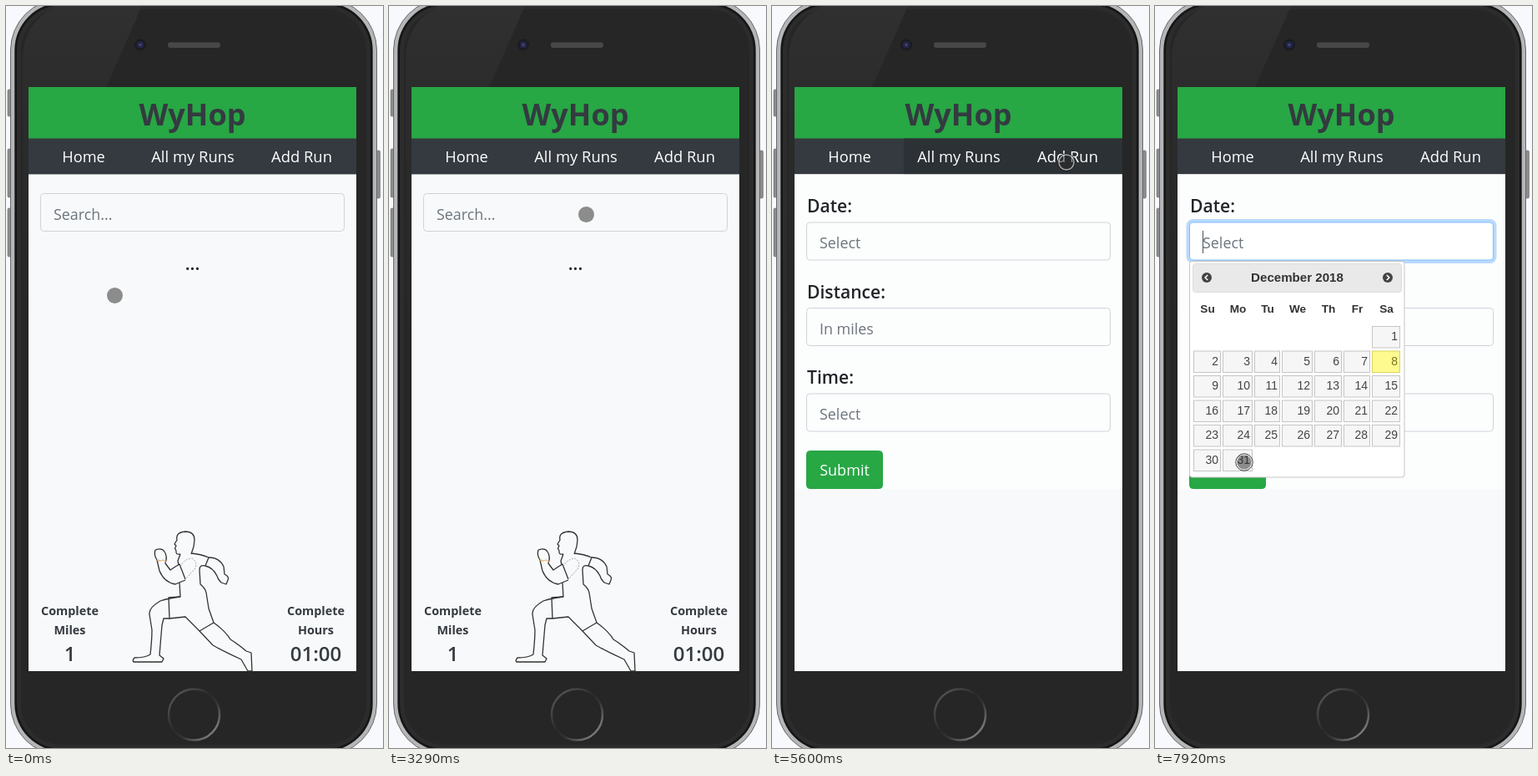
Recreate the animation shown at these times as an HTML page. Size 452 px wide and 888 px high, loop 8000 ms.

```html
<!DOCTYPE html>
<html lang="en">
<head>
<meta charset="utf-8">
<title>Run tracker demo</title>
<style>
  html, body { margin: 0; width: 100%; height: 100%; overflow: hidden; background: #f8f9fc; }
  svg { display: block; width: 452px; height: 888px; font-family: "Open Sans", "Noto Sans", sans-serif; }
  .cal { font-family: "Liberation Sans", Arial, sans-serif; }
</style>
</head>
<body>
<svg id="stage" viewBox="0 0 452 888" xmlns="http://www.w3.org/2000/svg"></svg>
<script>
const LOOP = 8000;
const INK = '#212529', DARK = '#343a40', GREEN = '#28a745', MUTED = '#6c757d', PAPER = '#f8f9fa';

const rect = (x, y, w, h, fill, more = '') =>
  `<rect x="${x}" y="${y}" width="${w}" height="${h}" fill="${fill}" ${more}/>`;
const text = (x, y, size, fill, str, weight = 400, anchor = 'start') =>
  `<text x="${x}" y="${y}" font-size="${size}" fill="${fill}" font-weight="${weight}" text-anchor="${anchor}">${str}</text>`;
const mid = (x, y, size, fill, str, weight) => text(x, y, size, fill, str, weight, 'middle');
const group = (id, body, more = '') => `<g id="${id}" ${more}>${body}</g>`;
const path = (d, more = '') => `<path d="${d}" ${more}/>`;

const input = (y, hint, id) =>
  rect(41.5, y + .5, 364, 45, 'none', 'rx="4" stroke="#ced4da"') +
  (id ? group(id, rect(39.5, y - 1.5, 368, 49, 'none', 'rx="6" stroke="#b9dafb" stroke-width="4"') +
    rect(41.5, y + .5, 364, 45, '#fff', 'rx="4" stroke="#80bdff"')) : '') +
  `<g ${id ? `id="${id}Hint"` : ''}>${text(57, y + 31.5, 17.9, MUTED, hint)}</g>`;

const button = (x, w, y, label, color, fill, ink) =>
  rect(x + .5, y + .5, w - 1, 45, fill, `rx="4" stroke="${color}"`) +
  mid(x + w / 2, y + 30, 18, ink, label);

function phone() {
  const shell = (inset, fill, more = '') =>
    rect(5 + inset, -9 + inset, 440 - inset * 2, 906 - inset * 2, fill, `rx="${62 - inset}" ${more}`);
  const key = (x, y, h) => rect(x, y, 4, h, '#8b8c8e', 'rx="1.5" stroke="#666" stroke-width=".6"');
  return key(2, 100, 32) + key(2, 171, 58) + key(2, 242, 58) + key(444.5, 173, 57) +
    shell(.5, '#b4b6b8', 'stroke="#66686a"') + shell(5.3, '#161616') + shell(8, '#2c2c2c') + shell(13, '#262626') +
    path('M20 400V60Q22 18 62 0H163L120 97H27V390Z', 'fill="url(#glare)"') +
    '<circle cx="161" cy="46.5" r="7" fill="#1b1c22"/><circle cx="161" cy="46.5" r="4" fill="#25274a"/><circle cx="161" cy="46.5" r="1.4" fill="#474b80"/>' +
    rect(194, 43.5, 63, 6.5, 'url(#mesh)', 'rx="3.2"') +
    '<circle cx="225.5" cy="848" r="30.5" fill="none" stroke="url(#ring)" stroke-width="2.4"/>';
}

function runner() {
  const lines = [
    'M209 656Q203 657 204 652L202.500 649L204 646L202 644L205 639Q203 630 215 629Q226 629 226 639L225 647L222 656',
    'M209 656L206 664L207 669M222 655Q234 656 243 660L239 670Q232 668 232 675L233 692Q239 697 240 702L243 721L249 738L232 748L215 731L196 733L195 708L209 707L208 690',
    'M190 653Q187 648 179 651Q177 657 181 663L184 676Q190 690 203 692L215 687M190 653Q194 659 191 667L197 675L203 671L208 668L215 686',
    'M243 660Q256 660 261 671L262 680Q268 683 266 687L264 692L258 690Q254 686 253 682Q248 672 239 670',
    'M209 707Q194 709 185 712Q171 720 172 728L175 747Q175 758 173 776Q167 780 154 780Q151 783 153 785H187L189 781L184 777L187 741L189 733H196',
    'M249 738Q263 748 269 758Q280 765 288 772L294 774L295 796H290L282 782Q262 773 248 765L232 748'
  ];
  return lines.map(d => path(d)).join('') +
    path('M209 671Q213 662 223 661Q231 666 226 674L215 686', 'stroke="#999" stroke-width=".9" stroke-dasharray="2 1.5"') +
    path('M181 663l4 1l3-1l4 2', 'stroke="#eab676"');
}

function home() {
  const stat = (x, unit, value) =>
    mid(x, 729, 14.4, DARK, 'Complete', 700) + mid(x, 752, 14.4, DARK, unit, 700) + mid(x, 784, 24, DARK, value, 600);
  return input(224, 'Search...', 'search') + group('typed', text(57, 256, 18, MUTED, '2')) +
    group('dots', mid(223.5, 316, 21.5, INK, '...', 600)) +
    group('noMatch', mid(223.5, 316, 21.5, INK, 'No match!', 600)) +
    `<g fill="none" stroke="#333" stroke-width="1.3" stroke-linejoin="round">${runner()}</g>` +
    stat(76.5, 'Miles', '1') + stat(371.5, 'Hours', '01:00');
}

function runs() {
  const row = (y, label, value) => text(50, y, 24.6, INK, label, 600) + text(239, y, 26.6, INK, value, 700);
  return rect(35, 234, 378, 191, PAPER, 'rx="4" filter="url(#shadow)"') +
    row(274, 'Date:', '12/01/2018') + row(313, 'Distance:', '1') + row(352, 'Time:', '1:00') +
    button(50, 64.5, 364, 'Edit', '#007bff', 'none', '#2a86e8') +
    button(118, 87, 364, 'Delete', '#dc3545', 'none', '#d64555');
}

function form() {
  const field = (y, label, hint, id) => text(42, y - 11.5, 21.1, INK, label, 600) + input(y, hint, id);
  return rect(27, 201.4, 393, 376.6, '#fcfdfd') +
    field(258.5, 'Date:', 'Select', 'date') + field(361, 'Distance:', 'In miles') + field(463.5, 'Time:', 'Select') +
    button(41, 92, 532, 'Submit', GREEN, GREEN, '#fff');
}

function calendar() {
  const left = [46, 81, 119, 152, 191, 226, 260], right = [79, 117, 150, 189, 224, 258, 294];
  const arrow = (x, dir) => `<circle cx="${x}" cy="325" r="6" fill="#444"/>` +
    path(`M${x - dir * 1.2} 322l${dir * 3} 3l${-dir * 3} 3`, 'fill="none" stroke="#fff" stroke-width="1.6"');
  let out = rect(41.5, 305.5, 257.5, 258.5, '#fff', 'rx="3" stroke="#c5c5c5"') +
    rect(45.5, 308.5, 250, 34, '#e9e9e9', 'rx="3" stroke="#ddd"') +
    arrow(62, -1) + arrow(279, 1) + mid(170.5, 330, 15.1, '#333', 'December 2018', 700);
  'Su Mo Tu We Th Fr Sa'.split(' ').forEach((name, i) => {
    out += mid((left[i] + right[i]) / 2 + .5, 367, 13.6, '#333', name, 700);
  });
  for (let day = 1; day <= 31; day++) {
    const col = (day + 5) % 7, y = 383 + Math.floor((day + 5) / 7) * 29.5, today = day === 8;
    out += rect(left[col] + .5, y + .5, right[col] - left[col] - 1, 25.5, today ? '#fffa90' : '#f6f6f6',
      `stroke="${today ? '#dad55e' : '#c5c5c5'}"`) +
      text(right[col] - 3, y + 17, 14, today ? '#777620' : '#454545', day, 400, 'end');
  }
  return out;
}

const NAV_TOP = 158.5, NAV_HEIGHT = 42.9;
const navBox = (x, w, fill) => rect(x, NAV_TOP, w, NAV_HEIGHT, fill);

const stage = document.getElementById('stage');
stage.innerHTML = `<defs>
  <linearGradient id="glare" gradientUnits="userSpaceOnUse" x1="0" y1="0" x2="0" y2="400">
    <stop offset="0" stop-color="#303030"/><stop offset=".25" stop-color="#2c2c2c"/><stop offset="1" stop-color="#262626"/></linearGradient>
  <linearGradient id="ring" x1="0" y1="0" x2="1" y2="1">
    <stop offset=".1" stop-color="#555"/><stop offset=".45" stop-color="#2a2a2a"/><stop offset=".6" stop-color="#333"/><stop offset=".85" stop-color="#777"/></linearGradient>
  <pattern id="mesh" width="3" height="3" patternUnits="userSpaceOnUse"><rect width="3" height="3" fill="#555"/><path d="M0 0h1.5v1.5h1.5v1.5h-1.5v-1.5h-1.5z" fill="#3b3b3b"/></pattern>
  <filter id="shadow" x="-10%" y="-10%" width="120%" height="130%"><feDropShadow dx="0" dy="6" stdDeviation="4.5" flood-opacity=".2"/></filter>
</defs>` +
  phone() + rect(27, 97, 393, 699, PAPER) + rect(27, 97, 393, 62, GREEN) +
  mid(223.5, 143, 36, DARK, 'WyHop', 700) + navBox(27, 393, DARK) +
  group('runsTab', navBox(158, 131, '#2c3136')) + group('addTab', navBox(289, 131, '#2c3136')) +
  mid(93, 187, 18.2, '#fff', 'Home') + mid(224, 187, 18.4, '#fff', 'All my Runs') + mid(354.5, 187, 18.4, '#fff', 'Add Run') +
  group('home', home()) + group('runs', runs()) + group('form', form()) +
  group('caret', rect(0, 0, 1, 27, '#495057')) + group('calendar', calendar(), 'class="cal"') +
  group('pointer', '<circle r="9.5" fill="#282828" fill-opacity=".52"/>' +
    group('press', '<circle r="10.2" stroke="#111" stroke-opacity=".85"/><circle r="9.1" stroke="#fff" stroke-opacity=".6" stroke-width="1.5"/>', 'fill="none"'));

const el = id => document.getElementById(id);
const show = (id, on) => el(id).setAttribute('display', on ? 'inline' : 'none');
const swing = p => .5 - Math.cos(Math.PI * Math.min(1, Math.max(0, p))) / 2;

// Pointer moves: first step, last step, number of steps, end x, end y, sag
const MOVES = [
  [250, 730, 5, 161.5, 248.5], [1540, 1690, 2, 188.5, 288], [1840, 2090, 3, 225, 347], [2490, 2490, 1, 225.5, 347.5],
  [3140, 3140, 1, 232, 320], [3290, 3290, 1, 236.5, 249.5], [3410, 3410, 1, 238, 203], [3560, 3800, 3, 236.5, 188.5],
  [4470, 5190, 7, 353, 186, 11], [5460, 5460, 1, 353, 187], [5840, 6200, 4, 331, 264], [6350, 6480, 2, 322.5, 287.5],
  [6900, 7500, 6, 146, 500], [7650, 7770, 2, 107, 543], [7920, 7920, 1, 107, 546]
];

function pointerAt(t) {
  let x = 130.5, y = 346.5;
  for (const [from, to, steps, endX, endY, sag = 0] of MOVES) {
    if (t < from) break;
    const gap = steps > 1 ? (to - from) / (steps - 1) : 1;
    const p = Math.min(steps, Math.floor((t - from) / gap + .001) + 1) / steps;
    const k = swing(p);
    x += (endX - x) * k;
    y += (endY - y) * k + sag * Math.sin(Math.PI * p);
  }
  return [x, y];
}

function draw(t) {
  const within = (a, b) => t >= a && t < b;
  const searching = within(870, 2640), typed = within(1260, 2640), dating = t >= 6630;

  show('home', t < 3940);
  show('runs', within(3940, 5600));
  show('form', t >= 5600);
  show('runsTab', within(3940, 6630));
  show('addTab', within(5460, 6630));

  show('search', searching);
  el('search').setAttribute('opacity', t < 990 ? .5 : 1);
  show('searchHint', !typed);
  show('typed', typed);
  show('noMatch', within(1410, 2640));
  show('dots', !within(1410, 2640));
  show('date', dating);

  show('caret', within(870, 1690) || within(2240, 2640) || within(6630, 7140) || t >= 7650);
  el('caret').setAttribute('transform', dating ? 'translate(57 269)' : `translate(${typed ? 68 : 57} 234.5)`);

  const fadeTime = t < 6750 ? 6630 : t < 6900 ? 6750 : t;
  show('calendar', dating);
  el('calendar').setAttribute('opacity', swing((fadeTime - 6624) / 200));

  el('pointer').setAttribute('transform', `translate(${pointerAt(t)})`);
  show('press', within(730, 990) || within(2490, 2770) || within(3800, 4470) ||
    within(5460, 5840) || within(6480, 6750) || t >= 7920);
}

const start = performance.now();
function tick() {
  draw((performance.now() - start) % LOOP);
  requestAnimationFrame(tick);
}
tick();
</script>
</body>
</html>
```
